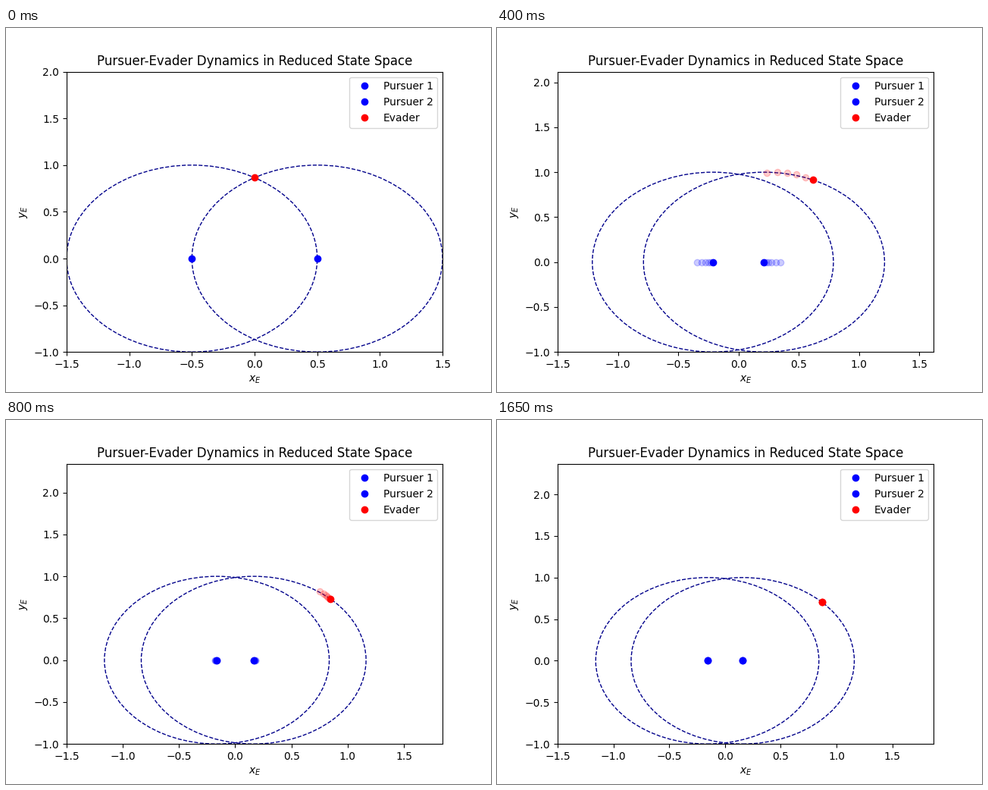
A matplotlib script that plays this animation: 640 px wide and 480 px high, repeating every 5000 ms.

```python
import numpy as np
import matplotlib.pyplot as plt
from matplotlib.animation import FuncAnimation
from matplotlib.patches import Circle

FRAMES, INTERVAL = 100, 50
LAST_STEP = 33
TRAIL = 5


def settle(step, centre, rate, power):
    """Sigmoid decay from 1 at step 0 towards 0."""
    start = 1 + np.exp(-rate * centre)
    return (start / (1 + np.exp(rate * (step - centre)))) ** power


def half_gap(step):
    return 0.1585 + 0.3415 * settle(step, -1.4, 0.21, 1.476)


def evader(step):
    """The evader slides along the right pursuer's unit circle."""
    x = 0.8685 * (1 - settle(step, 5, 0.24, 1.4583))
    x = x + 0.012 * step * np.exp(-1.2 * step)
    return x, np.sqrt(1 - (x - half_gap(step)) ** 2)


fig, ax = plt.subplots(figsize=(6.4, 4.8), dpi=100)
ax.set_title("Pursuer-Evader Dynamics in Reduced State Space")
ax.set_xlabel(r"$x_E$")
ax.set_ylabel(r"$y_E$")

COLORS = ("blue", "blue", "red")
LABELS = ("Pursuer 1", "Pursuer 2", "Evader")
trails = [ax.plot([], [], "o", color=c, alpha=0.2)[0] for c in COLORS]
heads = [ax.plot([], [], "o", color=c, label=name)[0]
         for c, name in zip(COLORS, LABELS)]
circles = [ax.add_patch(Circle((0, 0), 1, fill=False, ls="--", lw=1,
                               edgecolor="darkblue")) for _ in range(2)]
ax.legend(loc="upper right")


def update(frame):
    now = min(frame, LAST_STEP)
    steps = np.arange(max(0, now - TRAIL), now + 1)
    gap = half_gap(steps)
    ground = np.zeros(len(steps))
    paths = ((-gap, ground), (gap, ground), evader(steps))

    for (x, y), trail, head in zip(paths, trails, heads):
        trail.set_data(x[:-1], y[:-1])
        head.set_data(x[-1:], y[-1:])
    for circle, side in zip(circles, (-1, 1)):
        circle.center = (side * gap[-1], 0)

    x_evader = paths[2][0][-1]
    ax.set_xlim(-1.5, max(1.5, x_evader + 1))
    ax.set_ylim(-1, max(2, x_evader + 1.5))
    return trails + heads + circles


anim = FuncAnimation(fig, update, frames=FRAMES, interval=INTERVAL,
                     init_func=lambda: update(0), repeat=True)
plt.show()
```
